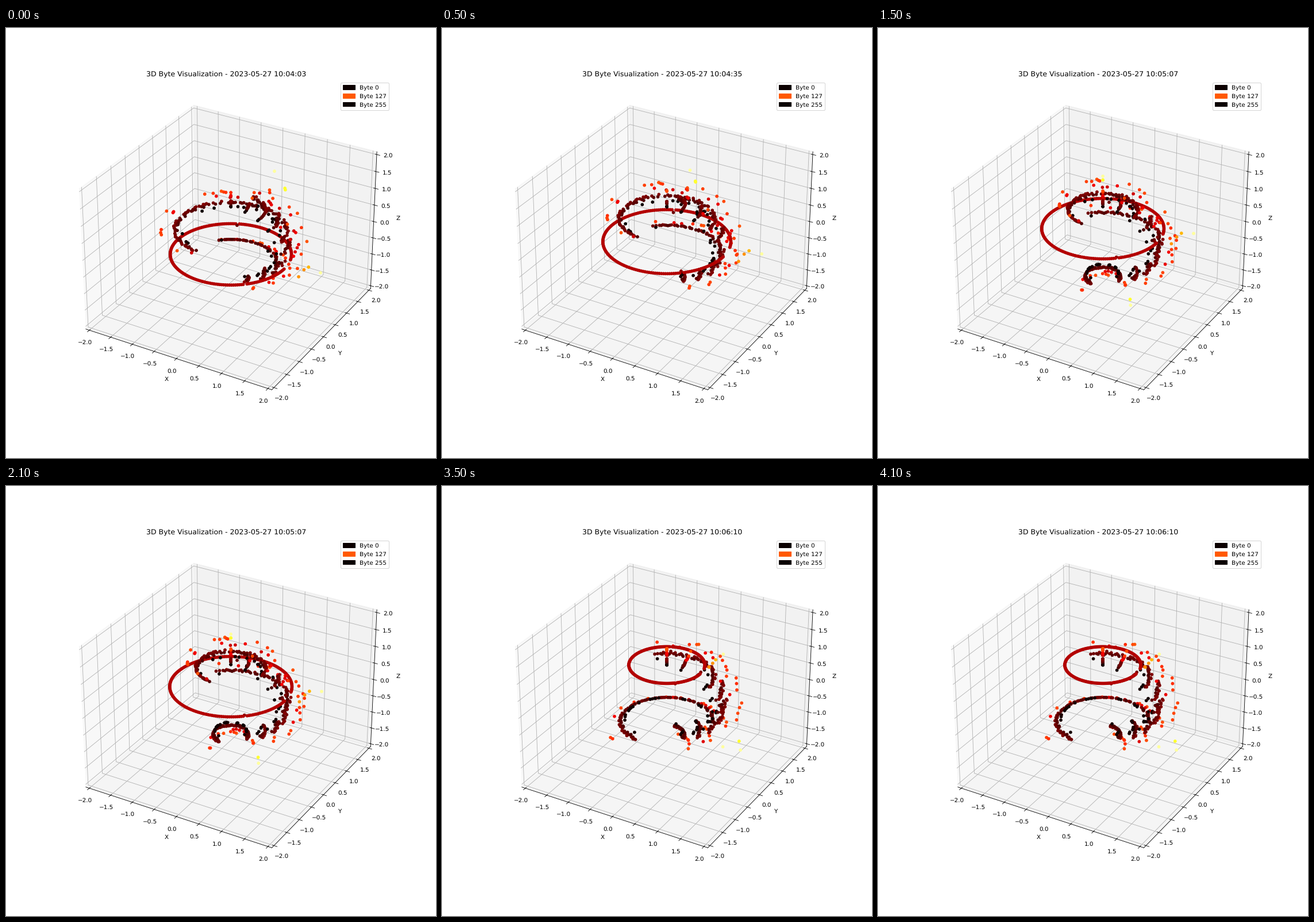
Recreate the animation shown at these times as a matplotlib script. Size 748 by 748 pixels, loop 4500 ms.

```python
import numpy as np
import matplotlib.pyplot as plt
from matplotlib.animation import FuncAnimation
from matplotlib.patches import Patch

STEP = 1.8           # degrees of azimuth per byte
ROWS = 10            # packets on the sphere at once
VIEWS = 5
PALE, YELLOW, AMBER = 230, 202, 163
CMAP = plt.get_cmap("hot")
RNG = np.random.default_rng(27)


def packet(span, bright=None, fill=None, head=16):
    """Random bytes over span degrees: mostly low, some zeros and letters.

    bright maps degrees to high bytes; fill repeats one byte after the head.
    """
    n = round(span / STEP) + 1
    low, zero, mid, letter = (RNG.integers(a, b, n) for a, b in
                              [(24, 46), (0, 8), (72, 90), (108, 125)])
    kind = RNG.random(n)
    data = np.select([kind < 0.10, kind < 0.15, kind < 0.26],
                     [zero, mid, letter], low)
    data[0] = 4
    if fill is not None:
        data[round(head / STEP):] = fill
    for deg, value in (bright or {}).items():
        data[round(deg / STEP)] = value
    return data


PACKETS = [
    packet(42),
    packet(36),
    packet(80, {34: YELLOW, 38: YELLOW, 70: PALE}),
    packet(42),
    packet(263),
    packet(34),
    packet(360, {0: 150, 10: 148, 14: PALE, 16: AMBER, 113: 36, 313: 48},
           fill=64, head=17),
    packet(135),
    packet(42),
    packet(28),
    packet(42),
    packet(260, {9: PALE, 18: YELLOW}),
    packet(58, {34: PALE}),
    packet(95),
]


def sphere_points(first):
    """Positions and byte values of the ten packets from first on."""
    parts = []
    for row, data in enumerate(PACKETS[first:first + ROWS]):
        polar = np.pi * row / ROWS
        azim = np.radians(STEP) * np.arange(len(data))
        r = 1 + data / 255
        parts.append([r * np.sin(polar) * np.cos(azim),
                      r * np.sin(polar) * np.sin(azim),
                      r * np.cos(polar),
                      data])
    return np.concatenate(parts, axis=1)


def clock(first):
    sec = int(3.9 + 31.75 * first)
    return f"2023-05-27 10:{4 + sec // 60:02d}:{sec % 60:02d}"


plt.rcParams["text.hinting"] = "none"
fig = plt.figure(figsize=(10, 10), dpi=74.8)
ax = fig.add_subplot(projection="3d")

clouds = []
for first in range(VIEWS):
    x, y, z, value = sphere_points(first)
    clouds.append(ax.scatter(x, y, z, c=CMAP(value / 255), depthshade=False))

# A small margin beyond the outer ticks
edge = 2 * 25 / 24
ticks = np.arange(-2, 2.1, 0.5)
ax.set(xlim=(-edge, edge), ylim=(-edge, edge), zlim=(-edge, edge),
       xticks=ticks, yticks=ticks, zticks=ticks,
       xlabel="X", ylabel="Y", zlabel="Z")
ax.legend(handles=[Patch(color=CMAP(0), label="Byte 0"),
                   Patch(color=CMAP(127), label="Byte 127"),
                   Patch(color=CMAP(0), label="Byte 255")],
          loc="upper right")


def update(i):
    # The first view lasts one tick, each later one two
    first = (i + 1) // 2
    for k, cloud in enumerate(clouds):
        cloud.set_visible(k == first)
    ax.set_title(f"3D Byte Visualization - {clock(first)}")
    return clouds


anim = FuncAnimation(fig, update, frames=2 * VIEWS - 1, interval=500,
                     repeat=True, repeat_delay=0)
plt.show()
```
